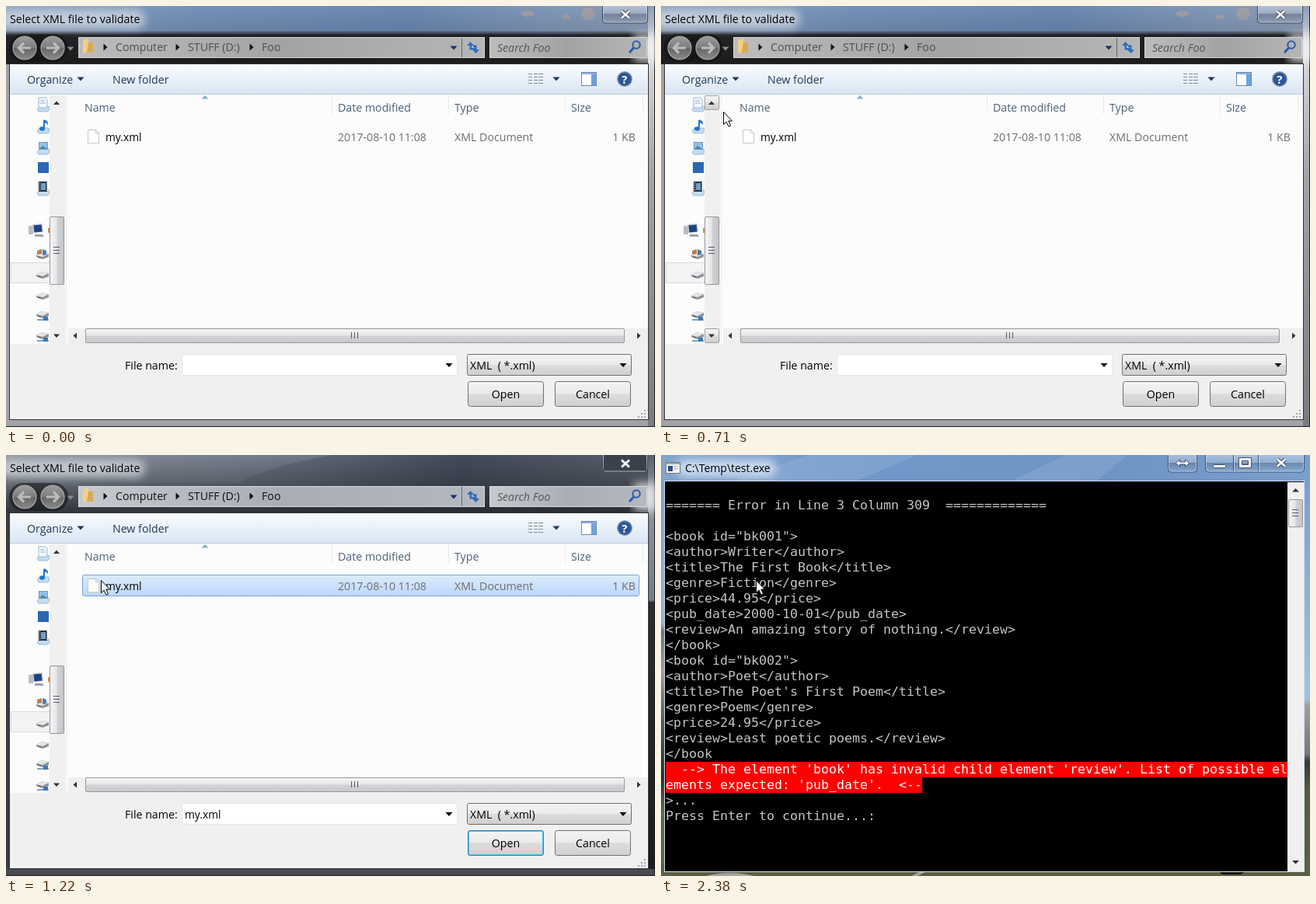
Animation, 835 px wide and 542 px high, one loop 4.9 s. Source, as an HTML page:

```html
<!DOCTYPE html>
<html lang="en">
<head>
<meta charset="utf-8">
<title>XML validation</title>
<style>
html, body { margin: 0; width: 100%; height: 100%; overflow: hidden; background: #000; }
#stage { position: relative; width: 835px; height: 542px; overflow: hidden; }
svg { position: absolute; left: 0; top: 0; }
text { font: 14.2px "Open Sans", "Noto Sans", sans-serif; white-space: pre; }
pre {
  position: absolute; left: 6px; top: 55px; margin: 0; color: #c4c4c4;
  font: 16.61px/20px "DejaVu Sans Mono", monospace;
}
pre b { display: block; width: 800px; font-weight: 400; color: #fff; background: #f00; }
pre b + b { width: 330px; }

.head { fill: #4c607a; }
.bar { fill: #1e395b; }
.info { fill: #6d6d6d; }
.btn { fill: url(#btn); stroke: #707070; }

/* one 4.9 s loop, hard cuts only */
.console, .report, .prompt, .hover, .picked, .arrows, .crumb, #pointer {
  animation: 4.9s step-end infinite;
}
.console { animation-name: console; }
.report { animation-name: report; }
.prompt { animation-name: prompt; }
.hover { animation-name: hover; }
.picked { animation-name: picked; }
.arrows { animation-name: arrows; }
.crumb { animation-name: crumb; }
#pointer { animation-name: pointer; }

@keyframes console { 0% { opacity: 0 } 27.75% { opacity: 1 } }
@keyframes report { 0% { opacity: 0 } 45.3% { opacity: 1 } }
@keyframes prompt { 0% { opacity: 0 } 46.93% { opacity: 1 } }
@keyframes hover {
  0%, 8.36%, 23.46% { opacity: 0 }
  6.93%, 16.12% { opacity: 1 }
}
@keyframes picked { 0% { opacity: 0 } 23.46% { opacity: 1 } }
@keyframes arrows { 0%, 20.61% { opacity: 0 } 8.36% { opacity: 1 } }
@keyframes crumb { 0% { fill: #4e4e4e } 23.46% { fill: #111 } }
@keyframes pointer {
  0% { opacity: 0; transform: translate(560px, 488px) }
  2.24% { transform: translate(560px, 488px) }
  3.87% { transform: translate(445px, 400px) }
  5.51% { transform: translate(290px, 280px) }
  6.93% { transform: translate(150px, 178px) }
  8.36% { transform: translate(68px, 145px) }
  9.99% { transform: translate(60px, 138px) }
  11.63% { transform: translate(61px, 130px) }
  12.85% { transform: translate(61px, 123px) }
  14.48% { transform: translate(80px, 136px) }
  16.12% { transform: translate(110px, 155px) }
  17.75%, 100% { transform: translate(122px, 161px) }
  2.24%, 100% { opacity: 1 }
}
</style>
</head>
<body>
<div id="stage">

<svg width="835" height="542" viewBox="0 0 835 542">
  <defs>
    <linearGradient id="btn" x2="0" y2="1">
      <stop stop-color="#f3f3f3"/><stop offset=".48" stop-color="#ebebeb"/>
      <stop offset=".5" stop-color="#dddddd"/><stop offset="1" stop-color="#cfcfcf"/>
    </linearGradient>
    <linearGradient id="thumbV">
      <stop stop-color="#f5f5f5"/><stop offset=".48" stop-color="#e6e6e8"/>
      <stop offset=".52" stop-color="#d2d3d6"/><stop offset="1" stop-color="#c4c5c9"/>
    </linearGradient>
    <linearGradient id="thumbH" x2="0" y2="1">
      <stop stop-color="#f5f5f5"/><stop offset=".48" stop-color="#e6e6e8"/>
      <stop offset=".52" stop-color="#d2d3d6"/><stop offset="1" stop-color="#c8c9cc"/>
    </linearGradient>
    <linearGradient id="tools" x2="0" y2="1">
      <stop stop-color="#fafcfe"/><stop offset=".5" stop-color="#e9f1fa"/>
      <stop offset="1" stop-color="#dae6f3"/>
    </linearGradient>
    <linearGradient id="title">
      <stop stop-color="#8ba3c4"/><stop offset=".3" stop-color="#7592bb"/>
      <stop offset=".62" stop-color="#6b89b3"/><stop offset=".85" stop-color="#8299ba"/>
      <stop offset="1" stop-color="#8c9db8"/>
    </linearGradient>
    <linearGradient id="titleLit">
      <stop stop-color="#8b929c"/><stop offset=".35" stop-color="#6c7583"/>
      <stop offset=".7" stop-color="#424b5a"/><stop offset="1" stop-color="#59606c"/>
    </linearGradient>
    <linearGradient id="fade" x2="0" y2="1">
      <stop stop-color="#161616" stop-opacity="0"/><stop offset=".42" stop-color="#161616" stop-opacity=".12"/>
      <stop offset=".5" stop-color="#161616" stop-opacity=".9"/><stop offset="1" stop-color="#1c1c1c"/>
    </linearGradient>
    <linearGradient id="fadeLit" x2="0" y2="1">
      <stop stop-color="#25292f" stop-opacity="0"/><stop offset=".5" stop-color="#25292f" stop-opacity=".4"/>
      <stop offset="1" stop-color="#25292f" stop-opacity=".9"/>
    </linearGradient>
    <linearGradient id="side" x2="0" y2="1">
      <stop stop-color="#8c9db8"/><stop offset=".1" stop-color="#dcdde0"/>
      <stop offset=".4" stop-color="#a4a4a9"/><stop offset="1" stop-color="#7b7b80"/>
    </linearGradient>
    <linearGradient id="sideLit" x2="0" y2="1">
      <stop stop-color="#59616f"/><stop offset=".1" stop-color="#8f96a1"/>
      <stop offset=".345" stop-color="#777d88"/><stop offset=".35" stop-color="#2b2d33"/>
      <stop offset="1" stop-color="#1b1c20"/>
    </linearGradient>
    <linearGradient id="field">
      <stop stop-color="#bcbcbc"/><stop offset=".5" stop-color="#a3a3a3"/><stop offset="1" stop-color="#b6b6b6"/>
    </linearGradient>
    <linearGradient id="fieldLit">
      <stop stop-color="#c6c9ce"/><stop offset=".5" stop-color="#a9adb5"/><stop offset="1" stop-color="#b4b8bf"/>
    </linearGradient>
    <linearGradient id="rowOn" x2="0" y2="1">
      <stop stop-color="#dcebfc"/><stop offset="1" stop-color="#bdd7fb"/>
    </linearGradient>
    <linearGradient id="rowHover" x2="0" y2="1">
      <stop stop-color="#fbfdff"/><stop offset="1" stop-color="#eef5fe"/>
    </linearGradient>
    <linearGradient id="glass" x2="0" y2="1">
      <stop stop-color="#fff" stop-opacity=".38"/><stop offset=".48" stop-color="#fff" stop-opacity=".2"/>
      <stop offset=".5" stop-color="#000" stop-opacity=".12"/><stop offset="1" stop-color="#fff" stop-opacity=".15"/>
    </linearGradient>
    <linearGradient id="orb" x2="0" y2="1">
      <stop stop-color="#9d9d9d"/><stop offset=".5" stop-color="#7c7c7c"/>
      <stop offset=".52" stop-color="#666"/><stop offset="1" stop-color="#8c8c8c"/>
    </linearGradient>
    <linearGradient id="sky">
      <stop stop-color="#82a4cd"/><stop offset=".35" stop-color="#7198c8"/>
      <stop offset=".7" stop-color="#6f95c4"/><stop offset="1" stop-color="#7b9fcc"/>
    </linearGradient>
    <linearGradient id="land" x2="0" y2="1">
      <stop stop-color="#7c9fce"/><stop offset=".36" stop-color="#94b3d8"/>
      <stop offset=".38" stop-color="#6c7280"/><stop offset=".48" stop-color="#a49c92"/>
      <stop offset=".6" stop-color="#57604f"/><stop offset=".75" stop-color="#2b2f27"/>
      <stop offset=".84" stop-color="#606748"/><stop offset="1" stop-color="#575f42"/>
    </linearGradient>
    <linearGradient id="hill" x2="0" y2="1">
      <stop stop-color="#7c9fce"/><stop offset=".55" stop-color="#a4c0e0"/>
      <stop offset=".57" stop-color="#a19c96"/><stop offset=".69" stop-color="#777780"/>
      <stop offset=".71" stop-color="#343a35"/><stop offset=".78" stop-color="#535b3c"/>
      <stop offset="1" stop-color="#5a6242"/>
    </linearGradient>
    <filter id="blur" x="-20%" y="-80%" width="140%" height="260%"><feGaussianBlur stdDeviation="6"/></filter>
    <clipPath id="tree"><rect x="5" y="115" width="51" height="319"/></clipPath>

    <path id="dn" d="M-4.5-2.5h9L0 2.5z"/>
    <path id="rt" d="M-2.5-4.5v9L2.5 0z"/>
    <path id="x" d="M-5-4.5L5 4.5M5-4.5L-5 4.5"/>
    <g id="drive">
      <path d="M-8 0L-1-4 8-2 8 2 0 5-8 2z" fill="#8d9298"/>
      <path d="M-8 0L-1-4 8-2 0 2z" fill="#e3e5e7"/>
      <path d="M-6 2l4 1" stroke="#4a4e52"/>
    </g>
    <g id="net">
      <use href="#drive" y="-2"/>
      <path d="M-7 5H8" stroke="#7ba3c9" stroke-width="2"/>
      <rect x="1" y="1" width="6" height="5" fill="#3f78b5"/>
    </g>
    <g id="shelf">
      <path d="M-8 5l3-4h12l1 4-2 3H-6z" fill="#c3dcf1" stroke="#86abcb" stroke-width=".7"/>
    </g>
    <g id="gripV" stroke="#555b66"><path d="M-4-4.5h8M-4-.5h8M-4 3.5h8"/></g>
  </defs>

  <!-- file dialog: window frame -->
  <rect width="835" height="542" fill="#a2a3a7"/>
  <rect width="835" height="75" fill="url(#title)"/>
  <g fill="#b7a69d" opacity=".6">
    <ellipse cx="671" cy="10" rx="9" ry="4"/><ellipse cx="720" cy="14" rx="6" ry="3"/>
    <ellipse cx="749" cy="10" rx="9" ry="8"/>
  </g>
  <rect width="835" height="75" fill="url(#fade)"/>
  <rect x="826" width="9" height="542" fill="url(#side)"/>
  <g class="picked">
    <rect width="835" height="75" fill="url(#titleLit)"/>
    <path d="M180 0H420Q330 16 300 36H150z" fill="#8c96a4" opacity=".35"/>
    <rect width="835" height="75" fill="url(#fadeLit)"/>
    <rect x="826" width="9" height="542" fill="url(#sideLit)"/>
    <rect y="75" width="5" height="467" fill="#3a3c42"/>
    <rect y="533" width="835" height="9" fill="#4a4b50"/>
  </g>
  <path d="M0 541.500H835M834.500 0V542" stroke="#222"/>
  <rect x="-8" y="5" width="186" height="24" rx="10" fill="#e2e6ec" opacity=".7" filter="url(#blur)"/>
  <rect x="808" y="36" width="30" height="36" fill="#f2f2f4" opacity=".8" filter="url(#blur)"/>
  <text x="5" y="22">Select XML file to validate</text>

  <path d="M767.5-1V18q0 4 4 4h50q4 0 4-4V-1z" fill="url(#glass)" stroke="#3b475a"/>
  <path d="M768.5-1V17q0 4 4 4h48q4 0 4-4V-1" fill="none" stroke="#fff" stroke-opacity=".4"/>
  <path class="picked" d="M769 0V20H824V0z" fill="#3b414c" opacity=".5"/>
  <g fill="none"><use href="#x" x="797" y="11" stroke="#4a5362" stroke-width="5"/>
    <use href="#x" x="797" y="11" stroke="#fff" stroke-width="2.6"/></g>

  <!-- navigation row -->
  <rect x="4" y="36" width="76" height="36" rx="18" fill="#111" opacity=".55"/>
  <g fill="url(#orb)" stroke="#a9a9a9" stroke-width="1.2">
    <circle cx="24" cy="54" r="15"/><circle cx="60" cy="54" r="15"/>
  </g>
  <g fill="none" stroke="#bcbcbc" stroke-width="3.2">
    <path d="M32 54H17M23 47.500L16.500 54l6.500 6.500M52 54H67M61 47.500L67.500 54l-6.500 6.500"/>
  </g>
  <use href="#dn" x="83" y="55" fill="#8c8c8c"/>
  <g stroke="#d8d8d8" fill="url(#field)">
    <rect x="93.500" y="40.500" width="522" height="26"/><rect x="622.500" y="40.500" width="202" height="26"/>
  </g>
  <g class="picked" stroke="#d9dce2" fill="url(#fieldLit)">
    <rect x="93.500" y="40.500" width="522" height="26"/><rect x="622.500" y="40.500" width="202" height="26"/>
  </g>
  <path d="M586.500 41V66" stroke="#686868"/>
  <path d="M99 44l7-2v17l-7 2z" fill="#f1cf86"/><path d="M106 47h6v13h-8z" fill="#d9a856"/>
  <g fill="#111"><use href="#rt" x="128" y="53"/><use href="#rt" x="221" y="53"/><use href="#rt" x="316" y="53"/></g>
  <use href="#dn" x="576" y="54" fill="#15306b"/>
  <g class="crumb">
    <text x="141" y="58">Computer</text><text x="234" y="58">STUFF (D:)</text><text x="329" y="58">Foo</text>
  </g>
  <g fill="#2d6cc0"><path d="M593 51l4.500-5 4.500 5h-3v3h5v2.500h-7.500V51z"/><path d="M609 56l-4.500 5-4.500-5h3v-3h-2v-2.500h4.500V56z"/></g>
  <text x="632" y="59" style="font-style:italic" fill="#555">Search Foo</text>
  <g fill="none" stroke="#2c5aa8" stroke-width="2"><circle cx="811" cy="50" r="4.700"/><path d="M807.500 54L802 60" stroke-width="3"/></g>

  <!-- client area -->
  <rect x="4.500" y="74.500" width="822" height="458" fill="#f0f0f0" stroke="#333"/>
  <rect x="5" y="75" width="821" height="38" fill="url(#tools)"/>
  <path d="M5 113.500H826" stroke="#b9c9dd"/>
  <g class="bar"><text x="27" y="100">Organize</text><text x="137" y="100">New folder</text>
    <use href="#dn" x="96" y="94"/><use href="#dn" x="708" y="94"/></g>
  <g stroke="#7c8ca1">
    <path d="M672 87.500h5m2 0h5m1 0h6M672 91.500h5m2 0h5m1 0h6M672 95.500h5m2 0h5m1 0h6M672 99.500h5m2 0h5m1 0h6"/>
  </g>
  <rect x="740.500" y="85.500" width="19" height="17" fill="#fff" stroke="#6c87a8"/>
  <path d="M741 87h18" stroke="#8fb0d8" stroke-width="2"/><rect x="753" y="88" width="6" height="14" fill="#6ba3dc"/>
  <circle cx="796" cy="94" r="9.300" fill="#2d5795" stroke="#8a98ab" stroke-width="1.400"/>
  <text x="792.200" y="99.500" fill="#fff" style="font-weight:700;font-size:15px">?</text>

  <rect x="5" y="114" width="821" height="321" fill="#fcfcfc"/>
  <g stroke="#e3e9ef"><path d="M419.500 115V139M569.500 115V139M719.500 115V139M819.500 115V139"/></g>
  <path d="M251.500 119.500l4.500-4.500 4.500 4.500z" fill="#7fb0d0"/>
  <g class="head"><text x="101" y="136">Name</text><text x="427" y="136">Date modified</text>
    <text x="577" y="136">Type</text><text x="727" y="136">Size</text></g>

  <rect class="hover" x="98.500" y="154.500" width="716" height="27" rx="2" fill="url(#rowHover)" stroke="#b8d6f5"/>
  <rect class="picked" x="98.500" y="154.500" width="716" height="27" rx="2" fill="url(#rowOn)" stroke="#7da2ce"/>
  <path d="M105.500 159.500h10l4 4v13h-14z" fill="#fff" stroke="#c8c8c8"/><path d="M115.500 159.500v4h4" fill="none" stroke="#c8c8c8"/>
  <text x="128" y="174" style="font-size:13.800px">my.xml</text>
  <g class="info"><text x="427" y="174">2017-08-10 11:08</text><text x="577" y="174">XML Document</text>
    <text x="810" y="174" text-anchor="end">1 KB</text></g>

  <!-- folder tree -->
  <g clip-path="url(#tree)">
    <rect x="6.500" y="330.500" width="60" height="26" fill="#f3f3f3" stroke="#d9d9d9"/>
    <g transform="translate(1)">
      <use href="#shelf" x="47" y="128"/><path d="M41 118h9l2 3v10H41z" fill="#f4f8fc" stroke="#9db7d0"/><path d="M43 122h6m-6 3h7" stroke="#8fadcb"/>
      <use href="#shelf" x="47" y="156"/><path d="M48 147v10" stroke="#2474c9" stroke-width="2"/><path d="M48 146q6 2 5 7q-2-3-5-3z" fill="#2474c9"/><ellipse cx="45.500" cy="158" rx="3.500" ry="2.800" fill="#2474c9"/>
      <use href="#shelf" x="47" y="183"/><rect x="41.500" y="175.500" width="11" height="9" fill="#8fc0ea" stroke="#7898b8"/><path d="M42 184l4-4 6 4z" fill="#4d86a0"/>
      <rect x="40" y="201" width="14" height="14" fill="#2a68b5"/>
      <use href="#shelf" x="47" y="236"/><rect x="41" y="226" width="11" height="13" fill="#25303c"/><rect x="44" y="228" width="6" height="9" fill="#6f9fca"/><path d="M42.500 227v11M51.500 227v11" stroke="#dfe6ec" stroke-dasharray="1.500"/>
    </g>
    <path d="M29 283h6v11h-6z" fill="#b8bec5"/><path d="M34 281l13-1 1 11-13 1z" fill="#c9ced3"/><path d="M35.500 282.500l10-1 1 9-10 1z" fill="#1d4384"/><path d="M37 294h10l2 3H37z" fill="#9ba3ab"/>
    <path d="M55 286v6" stroke="#e0873f" stroke-width="2"/>
    <use href="#drive" x="47" y="321"/><path d="M40 315l6-2v6l-6 1z" fill="#c07a4c"/><path d="M47 313l5 2v5l-5 1z" fill="#4c7cb4"/>
    <use href="#drive" x="47" y="346"/><use href="#drive" x="47" y="373"/>
    <use href="#net" x="47" y="399"/><use href="#net" x="47" y="426"/>
  </g>
  <rect x="56" y="115" width="20" height="320" fill="#f0f0f0"/>
  <path d="M77.500 114V435" stroke="#e6eaf0"/>
  <g class="arrows" fill="url(#btn)" stroke="#a0a0a0">
    <rect x="56.500" y="115.500" width="18" height="18" rx="1"/><rect x="56.500" y="415.500" width="18" height="18" rx="1"/>
  </g>
  <path d="M61 127l4-4.500 4 4.500z" fill="#333"/><path d="M61 422.500h8l-4 4.500z" fill="#333"/>
  <rect x="56.500" y="271.500" width="18" height="87" rx="1.500" fill="url(#thumbV)" stroke="#979797"/>
  <use href="#gripV" x="65" y="315"/>

  <rect x="80" y="415" width="746" height="20" fill="#f0f0f0"/>
  <rect x="102.500" y="415.500" width="693" height="18" rx="1.500" fill="url(#thumbH)" stroke="#979797"/>
  <path d="M444.500 420v8M448.500 420v8M452.500 420v8" stroke="#555b66"/>
  <path d="M91 420.500v8l-4.500-4zM812 420.500v8l4.500-4z" fill="#333"/>

  <!-- lower panel -->
  <text x="153" y="468">File name:</text>
  <rect x="226.500" y="448.500" width="354" height="27" fill="#fff" stroke="#e5e8ec"/>
  <use href="#dn" x="570" y="462.500"/>
  <text class="picked" x="230" y="468" style="font-size:13.800px">my.xml</text>
  <rect class="btn" x="593.500" y="448.500" width="211" height="27" rx="2"/>
  <text x="597" y="468">XML  ( *.xml)</text><use href="#dn" x="794" y="462.500"/>
  <rect class="btn" x="594.500" y="483.500" width="97" height="32" rx="3"/>
  <rect class="btn" x="706.500" y="483.500" width="97" height="32" rx="3"/>
  <g class="picked" fill="none"><rect x="594.500" y="483.500" width="97" height="32" rx="3" stroke="#3c7fb1"/>
    <rect x="595.500" y="484.500" width="95" height="30" rx="2" stroke="#46c4ee"/></g>
  <text x="643" y="505" text-anchor="middle">Open</text><text x="755" y="505" text-anchor="middle">Cancel</text>
  <path d="M821 521h2M817 525h2m2 0h2M813 529h2m2 0h2m2 0h2" stroke="#a5a5a5" stroke-width="2"/>

  <!-- console window -->
  <g class="console">
    <rect width="835" height="542" fill="url(#sky)"/>
    <path d="M190 0H330L250 34H90zM520 0H600L560 34H450z" fill="#a9c3e3" opacity=".22"/>
    <rect y="34" width="6" height="508" fill="url(#land)"/>
    <rect x="827" y="34" width="8" height="508" fill="url(#hill)"/>
    <rect y="536" width="835" height="6" fill="#596043"/>
    <path d="M58 542q30-8 62 0zM322 542l12-6h8l-12 6z" fill="#a5a3a0"/><path d="M718 536h34l-6 4h-24z" fill="#14160f"/>
    <rect x="20" y="6" width="128" height="22" rx="10" fill="#dfeafa" opacity=".8" filter="url(#blur)"/>
    <rect x="6.500" y="9.500" width="18" height="14" fill="#f4f4f4" stroke="#777"/>
    <path d="M7 11h17" stroke="#9ab" stroke-width="2"/><rect x="9" y="14" width="6" height="7" fill="#2f4f7c"/><path d="M17 15h5m-5 3h5" stroke="#9aa3ad"/>
    <text x="31" y="22" style="font-size:14px">C:\Temp\test.exe</text>

    <g fill="url(#glass)" stroke="#3c5476">
      <path d="M652.500-1V18q0 4 4 4h29q4 0 4-4V-1zM700.500-1V18q0 4 4 4h119q4 0 4-4V-1z"/>
      <path d="M736.500 0V21M768.500 0V21"/>
    </g>
    <path d="M653.500-1V17q0 4 4 4h27q4 0 4-4V-1M701.500-1V17q0 4 4 4h117q4 0 4-4V-1M737.500 0V21M769.500 0V21" fill="none" stroke="#fff" stroke-opacity=".45"/>
    <g fill="#fff" stroke="#434f61">
      <path d="M662.500 10.500l5-4.500v3h7V6l5 4.500-5 4.500v-3h-7v3z"/>
      <rect x="710.500" y="12.500" width="16" height="4" rx="1"/>
      <path fill-rule="evenodd" d="M743.500 3.500h16v13h-16zM747.500 7.500v5h8v-5z"/>
    </g>
    <g fill="none"><use href="#x" x="798" y="10" stroke="#434f61" stroke-width="5"/>
      <use href="#x" x="798" y="10" stroke="#fff" stroke-width="2.800"/></g>

    <rect x="4.500" y="33.500" width="823" height="503" fill="#000" stroke="#d4e3f4"/>
    <rect x="806" y="35" width="21" height="501" fill="#f0f0f0"/>
    <path d="M812 47.500l4.500-4.500 4.500 4.500zM812 522h9l-4.500 4.500z" fill="#333"/>
    <rect x="807.500" y="57.500" width="18" height="35" rx="1.500" fill="url(#thumbV)" stroke="#979797"/>
    <use href="#gripV" x="816" y="75"/>
  </g>
</svg>

<pre class="report">======= Error in Line 3 Column 309  =============

&lt;book id="bk001"&gt;
&lt;author&gt;Writer&lt;/author&gt;
&lt;title&gt;The First Book&lt;/title&gt;
&lt;genre&gt;Fiction&lt;/genre&gt;
&lt;price&gt;44.95&lt;/price&gt;
&lt;pub_date&gt;2000-10-01&lt;/pub_date&gt;
&lt;review&gt;An amazing story of nothing.&lt;/review&gt;
&lt;/book&gt;
&lt;book id="bk002"&gt;
&lt;author&gt;Poet&lt;/author&gt;
&lt;title&gt;The Poet's First Poem&lt;/title&gt;
&lt;genre&gt;Poem&lt;/genre&gt;
&lt;price&gt;24.95&lt;/price&gt;
&lt;review&gt;Least poetic poems.&lt;/review&gt;
&lt;/book<b>  --&gt; The element 'book' has invalid child element 'review'. List of possible el</b><b>ements expected: 'pub_date'.  &lt;--</b>&gt;...
<span class="prompt">Press Enter to continue...:</span></pre>

<svg width="835" height="542" viewBox="0 0 835 542">
  <path id="pointer" d="M.5.500V16.500L4 13l3 6.200 2.600-1.200L6.800 12H11.500z" fill="#fff" stroke="#000"/>
</svg>

</div>
</body>
</html>
```
